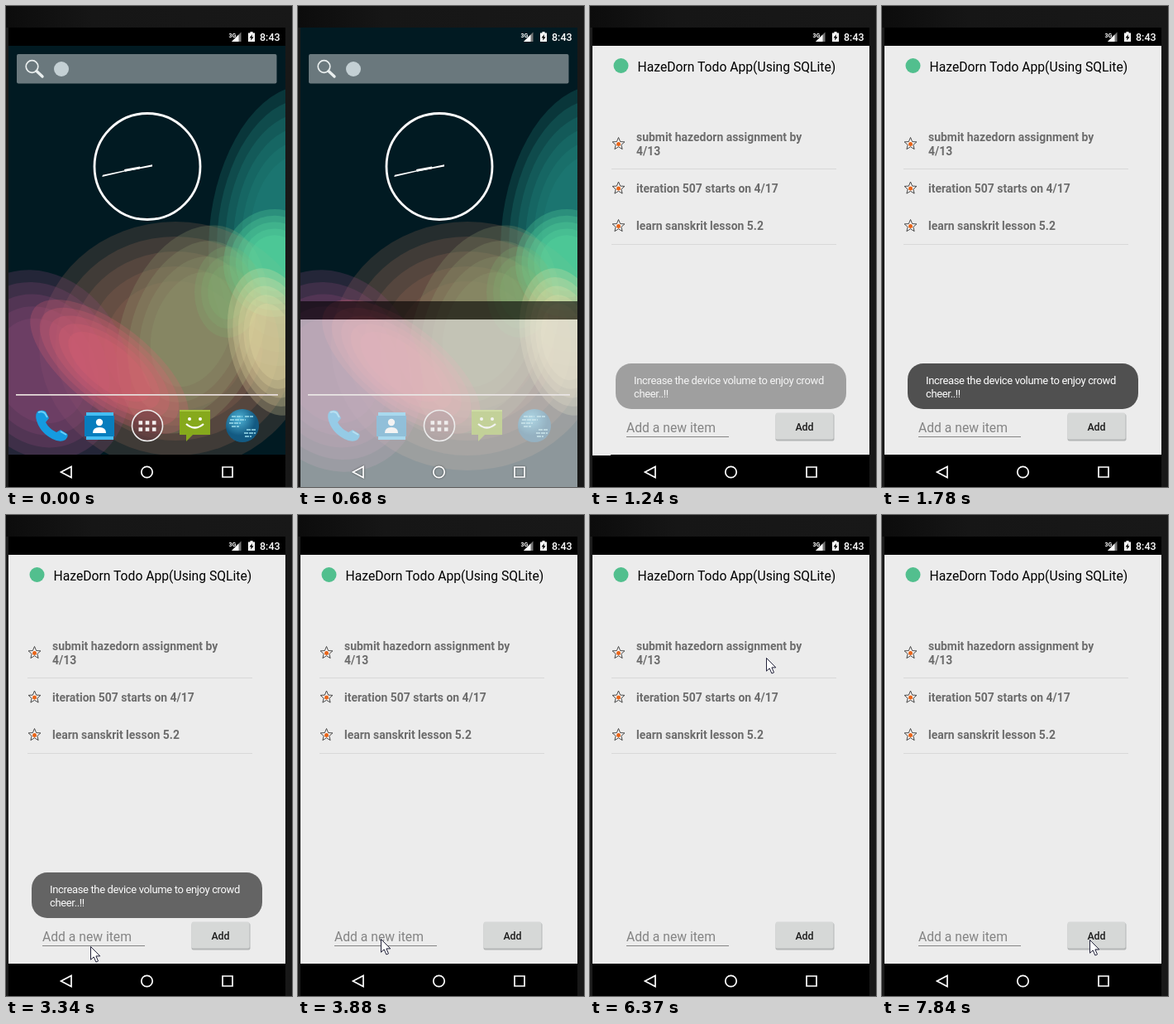
Animation, 346 px wide and 580 px high, one loop 8000 ms. Source, as an HTML page:

```html
<!DOCTYPE html>
<html lang="en">
<head>
<meta charset="utf-8">
<title>Todo app demo</title>
<style>
html, body { margin: 0; width: 100%; height: 100%; overflow: hidden; background: #161616; }
svg { display: block; width: 346px; height: 580px; font-family: Roboto, sans-serif; }
.item { font-weight: 700; font-size: 13.95px; fill: #6c6c6c; }
.toast { font-size: 13px; letter-spacing: -.35px; fill: #fff; }
.nav { fill: none; stroke: #fff; stroke-width: 1.7; filter: drop-shadow(0 0 1px #0008); }
</style>
</head>
<body>
<svg viewBox="0 0 346 580">
  <defs>
    <clipPath id="screen"><path d="M3 26H338V580H3z"/></clipPath>
    <linearGradient id="bezel"><stop offset="0" stop-color="#0c0c0c"/><stop offset=".3" stop-color="#161616"/><stop offset="1" stop-color="#181818"/></linearGradient>
    <radialGradient id="globeFill" cx=".4" cy=".3"><stop offset="0" stop-color="#4fb4d8"/><stop offset="1" stop-color="#135a82"/></radialGradient>
    <g id="star">
      <path d="M0-7.5 2.1-2.4 7.4-2.1 3.3 1.4 4.6 6.6 0 3.7-4.6 6.6-3.3 1.4-7.4-2.1-2.1-2.4z" fill="#fff" stroke="#444"/>
      <circle cy=".4" r="2.5" fill="#e8651a"/>
    </g>
  </defs>
  <path d="M0 0H346V580H0z" fill="url(#bezel)"/>
  <path d="M0 26H3V580H0z" fill="#1c1c1c"/>

  <g clip-path="url(#screen)">
    <g id="home">
      <path d="M3 26H338V580H3z" fill="#011a22"/>
      <g id="wallpaper"></g>

      <rect x="13" y="58" width="314.500" height="35.500" rx="2" fill="#fff" fill-opacity=".41"/>
      <g fill="none" stroke="#e9eeee">
        <circle cx="31.500" cy="73" r="7.300" stroke-width="1.700"/>
        <path d="M37 78.500 44 85" stroke-width="3.400" stroke-linecap="round"/>
      </g>
      <circle cx="67" cy="76" r="9" fill="#c4d0d4"/>

      <circle cx="171" cy="193.500" r="64" fill="none" stroke="#fff" stroke-width="2.800"/>
      <path d="M177 191.300 117 203.800 116.300 206 144 199.600 177 193.500z" fill="#fff"/>
      <path d="M143 197 162 193.600V196.300L144 199.800z" fill="#fff"/>

      <path d="M12 468.800H329" stroke="#e6dcda" stroke-width="1.700"/>

      <path d="M38 489Q44 486 48 489L52 497 48 502Q52 510 61 514L66 511 74 516Q76 519 72 523 66 527 56 522 41 514 37 500 35 493 38 489z" fill="#159be0"/>
      <path d="M39 490Q44 488 47 491L50 496M66 513 73 517" fill="none" stroke="#6cd0fa" stroke-width="2"/>

      <path d="M97 490H130V523H97z" fill="#1a9ee2"/>
      <path d="M97 490H130V494H97zM97 519H130V523H97z" fill="#45bdf2"/>
      <path d="M95 494H131V519H95z" fill="#087dbd"/>
      <circle cx="113" cy="502" r="4.200" fill="#fff"/>
      <path d="M105 515Q105 508 113 508T121 515z" fill="#fff"/>

      <circle cx="171" cy="506" r="18.500" fill="#6b3c42" fill-opacity=".6" stroke="#eee" stroke-width="1.600"/>
      <path d="M160.500 502.500H181.500M160.500 510.500H181.500" stroke="#f4f0f0" stroke-width="4.600" stroke-dasharray="4.600 3.600"/>

      <path d="M210 487H247V517H226L218 525V517H210z" fill="#86a91c"/>
      <path d="M210 487H247V489H210z" fill="#a5c63d"/>
      <circle cx="222" cy="498" r="2" fill="#fff"/><circle cx="235" cy="498" r="2" fill="#fff"/>
      <path d="M218 504Q228.500 513 239 504" fill="none" stroke="#fff" stroke-width="2.300"/>

      <circle cx="286" cy="506" r="20" fill="url(#globeFill)"/>
      <path d="M273 495H286M271 499H290M270 503H284M273 507H282M289 495H299M291 511H303M288 515H302M289 519H297" stroke="#9bdcec" stroke-width="1.600" stroke-dasharray="5 1"/>
    </g>

    <g id="window">
      <path d="M3 26H338V48H3z"/>
      <path d="M3 48H338V580H3z" fill="#ececec"/>
    </g>

    <g id="app">
      <circle cx="37.500" cy="72" r="9" fill="#52bf8e"/>
      <text x="57.500" y="79" font-size="15.700">HazeDorn Todo App(Using SQLite)</text>
      <use href="#star" x="34.500" y="166"/>
      <use href="#star" x="34.500" y="219.500"/>
      <use href="#star" x="34.500" y="265"/>
      <g class="item">
        <text x="56" y="163">submit hazedorn assignment by</text>
        <text x="56" y="179.500">4/13</text>
        <text x="56" y="225">iteration 507 starts on 4/17</text>
        <text x="56" y="270">learn sanskrit lesson 5.2</text>
      </g>
      <path d="M26 196.500H298M26 287.500H298" stroke="#d8d8d8"/>
      <text x="44" y="514" font-size="15.700" fill="#848484">Add a new item</text>
      <path d="M44 519.500H168" stroke="#858585"/>
      <rect x="224.500" y="492" width="71" height="32.500" rx="2" fill="#b4b6b6"/>
      <rect x="224.500" y="490.500" width="70" height="32" rx="2" fill="#d6d8d7"/>
      <text x="259.500" y="511.500" font-size="12.400" font-weight="500" text-anchor="middle" fill="#1c1c1c">Add</text>
    </g>

    <g id="bars"><path d="M3 26H338V48H3zM3 541H338V580H3z"/></g>
    <path id="edge" d="M3 541.500H25" stroke="#ececec"/>

    <g fill="#fff">
      <text x="269.500" y="37.500" font-size="7" font-weight="700">3G</text>
      <path d="M273 43 284.500 31.500V43z" fill="#777"/>
      <path d="M273 43 281.500 34.500V43z"/>
      <path d="M293 32.500H295.500V31H298.500V32.500H301V43H293z"/>
      <path d="M298 34 294.500 38.500H296.700L296 42 299.600 37.300H297.400z" fill="#000"/>
      <text x="307" y="42" font-size="12.500" font-weight="500">8:43</text>
    </g>
    <g class="nav">
      <path d="M66.500 562 79 555.500V568.500zM262 556H274V568H262z"/>
      <circle cx="170.500" cy="562" r="6.700"/>
    </g>

    <g id="toast">
      <rect x="31" y="431" width="279" height="55" rx="19" fill="#505050"/>
      <text class="toast" x="53" y="455.500">Increase the device volume to enjoy crowd</text>
      <text class="toast" x="53" y="472">cheer..!!</text>
    </g>
    <path id="cursor" d="M.5.5V16.200L4.200 12.900 6.900 19 9.500 17.900 6.900 11.900H11.800z" fill="#fff" stroke="#22223a"/>
  </g>
</svg>
<script>
const LOOP = 8000;
const el = id => document.getElementById(id);

// Concentric translucent ellipses give the banded glow of the wallpaper.
function glow(cx, cy, rx, ry, angle, color, rings, alpha) {
  let out = '';
  for (let i = 0; i < rings; i++) {
    const k = 1 - i * .6 / rings;
    out += `<ellipse rx="${rx * k}" ry="${ry * k}" fill="${color}" fill-opacity="${alpha}"
      transform="translate(${cx} ${cy}) rotate(${angle})"/>`;
  }
  return out;
}
el('wallpaper').innerHTML =
  glow(345, 265, 98, 170, 8, '#20897f', 6, .25) +
  glow(205, 410, 165, 150, 0, '#966a54', 5, .24) +
  glow(225, 390, 85, 130, 20, '#8f9a70', 4, .25) +
  glow(42, 440, 105, 125, -25, '#8c4a78', 5, .25) +
  glow(325, 310, 62, 65, 0, '#5ce2a4', 5, .24) +
  glow(268, 345, 40, 55, 0, '#7fb876', 3, .2) +
  glow(322, 405, 52, 90, -12, '#efe0a8', 5, .24) +
  glow(125, 435, 115, 50, 38, '#dd6270', 5, .24);

// Rows start with their time; each one holds until the next.
const opening = [ // time, window offset, window opacity, system bar opacity
  [0, 554, 0, 1], [400, 554, 0, .5], [520, 480, .3, 0],
  [680, 330, .6, 0], [820, 168, .89, 0], [940, 0, 1, 1]];
const content = [[0, 0], [1090, .5], [1240, 1]];
const toast = [[0, 0], [1240, .49], [1360, .8], [1510, 1], [3340, .87],
  [3460, .65], [3580, .42], [3730, .2], [3880, 0]];
const pointer = [[0, -50, -50], [3340, 102, 520], [3460, 101, 516], [3580, 100, 512],
  [3730, 100, 511], [4870, 128, 400], [4990, 165, 244], [5180, 255, 120],
  [5310, 251, 79], [5450, 251, 76], [6370, 213, 172], [6490, 183, 385],
  [6640, 185, 390], [6920, 144, 502], [7060, 134, 515], [7180, 178, 524],
  [7300, 223, 523], [7450, 240, 527], [7580, 248, 514], [7720, 250, 513], [7840, 251, 512]];

const at = (rows, t) => rows.findLast(row => row[0] <= t).slice(1);

function draw(now) {
  const t = now % LOOP;
  const [offset, opacity, bars] = at(opening, t);
  const [x, y] = at(pointer, t);
  el('window').setAttribute('transform', `translate(0 ${offset})`);
  el('window').setAttribute('opacity', opacity);
  el('bars').setAttribute('opacity', bars);
  el('app').setAttribute('opacity', at(content, t)[0]);
  el('toast').setAttribute('opacity', at(toast, t)[0]);
  el('edge').setAttribute('opacity', t >= 1090 && t < 1780 ? 1 : 0);
  el('cursor').setAttribute('transform', `translate(${x} ${y})`);
  requestAnimationFrame(draw);
}
requestAnimationFrame(draw);
</script>
</body>
</html>
```
